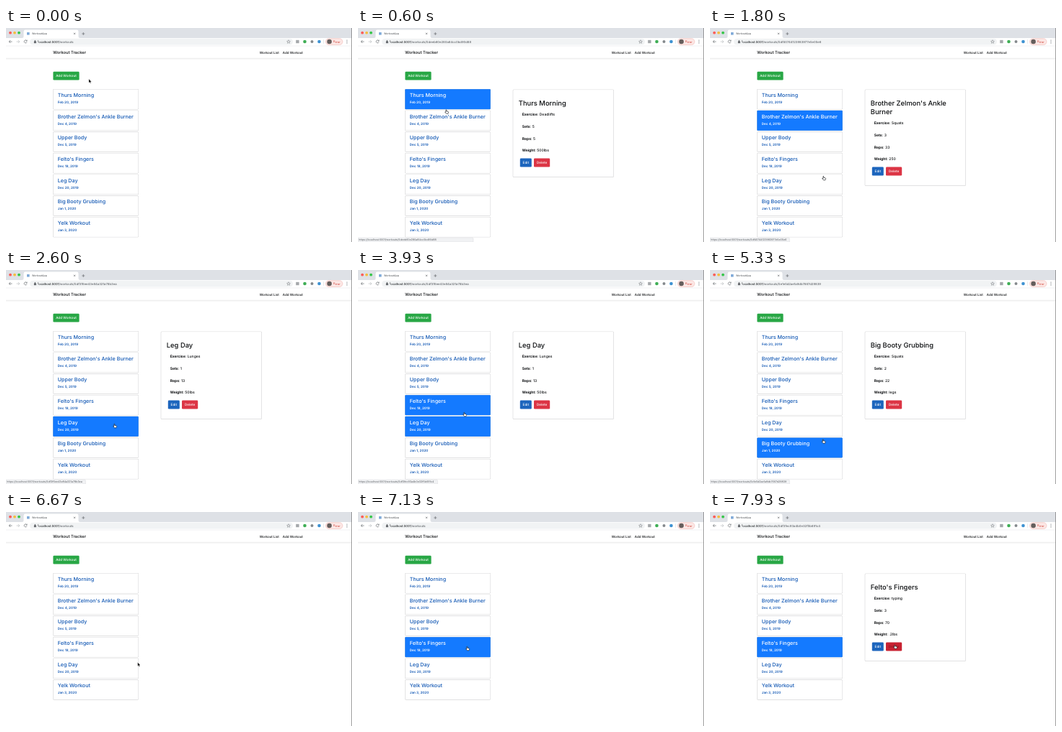
Animation of 480 by 298 pixels, one loop 8000 ms. Source, as an HTML page:

```html
<!DOCTYPE html>
<html lang="en">
<head>
<meta charset="utf-8">
<title>Workout Tracker</title>
<style>
  html, body { margin: 0; width: 100%; height: 100%; overflow: hidden; background: #fff; }
  svg { display: block; width: 480px; height: 298px; }
  /* the hair of rotation keeps tiny glyphs from snapping to the pixel grid */
  text {
    font-family: Inter, "Liberation Sans", sans-serif; font-weight: 500; white-space: pre;
    text-rendering: geometricPrecision;
    transform: rotate(.02deg); transform-box: fill-box;
  }
  .box { filter: drop-shadow(.7px .7px .5px rgba(0, 0, 0, .4)); }
</style>
</head>
<body>
<svg viewBox="0 0 480 298">
  <rect width="480" height="298" fill="#fff"/>
  <g id="browser">
    <rect width="480" height="14" fill="#dee1e6"/>
    <circle cx="6" cy="6.7" r="1.9" fill="#fc5b57"/>
    <circle cx="12" cy="6.7" r="1.9" fill="#f5bd3f"/>
    <circle cx="18" cy="6.7" r="1.9" fill="#35c649"/>
    <path d="M22 14Q24.5 14 24.5 11.5V5Q24.5 2.6 27 2.6H98Q100.500 2.6 100.500 5V11.500Q100.500 14 103 14Z" fill="#fff"/>
    <rect x="29" y="6" width="3.600" height="3.600" fill="#7fa9d8"/>
    <path d="M94 6.700l2.200 2.200m0-2.200l-2.200 2.200M107.300 6v4m-2-2h4" stroke="#55585c" stroke-width=".6"/>
    <rect y="14" width="480" height="11" fill="#fff"/>
    <g fill="none" stroke="#5f6368" stroke-width=".65">
      <path d="M8.500 19H4.200m2-2l-2 2l2 2"/>
      <path d="M14.500 19h4.300m-2-2l2 2l-2 2" stroke="#b4b7bb"/>
      <path d="M28.700 17.600A2 2 0 1 0 29 19.600M29.100 16.500v1.700h-1.700"/>
    </g>
    <rect x="33" y="14.800" width="365" height="8.600" rx="4.300" fill="#f1f3f4"/>
    <path d="M39 18.700h2.700v2.300H39zM39.600 18.700v-.7a.75.75 0 0 1 1.500 0v.7" fill="#5f6368" stroke="#5f6368" stroke-width=".3"/>
    <path d="M392 16.700l.7 1.600 1.700.1-1.300 1.100.4 1.700-1.500-.9-1.500.9.4-1.700-1.300-1.100 1.700-.1z" fill="none" stroke="#5f6368" stroke-width=".45"/>
    <rect x="402.200" y="16.800" width="4.400" height="4.400" fill="#a5a8ab"/>
    <circle cx="414.500" cy="19" r="2.300" fill="#3fae55"/>
    <circle cx="424.500" cy="19" r="2" fill="#84888c"/>
    <circle cx="434.500" cy="19" r="2.300" fill="#3f92d2"/>
    <path d="M440.500 16v6" stroke="#d5d7da" stroke-width=".5"/>
    <rect x="443.500" y="14.700" width="23.500" height="8.700" rx="4.350" fill="#fce8e6" stroke="#eeaaa4" stroke-width=".5"/>
    <circle cx="448.600" cy="19" r="3.300" fill="#655e5c"/>
    <g fill="#5f6368"><circle cx="473" cy="17" r=".6"/><circle cx="473" cy="19" r=".6"/><circle cx="473" cy="21" r=".6"/></g>
    <path d="M0 25H480" stroke="#e2e3e5" stroke-width=".5"/>
    <path d="M0 42.300H480" stroke="#dcdcdc" stroke-width=".6"/>
    <path d="M0 43.100H480" stroke="#f1f1f1"/>
    <rect x="479.300" width=".7" height="298" fill="#777"/>
  </g>
  <g id="page"></g>
  <g id="cursor" stroke-linejoin="round"><path/></g>
</svg>
<script>
const BLUE = '#147aff', LINK = '#1258b4', INK = '#0c0e10';
const $ = id => document.getElementById(id);

// title, date, id, exercise, sets, reps, weight
const workouts = [
  ['Thurs Morning', 'Feb 20, 2019', '5deeb60e280a84cc0bd90d88', 'Deadlifts', 5, 5, '500lbs'],
  ["Brother Zelmon's Ankle Burner", 'Dec 4, 2019', '5df40744123983977e5e05e6', 'Squats', 3, 33, '250'],
  ['Upper Body', 'Dec 5, 2019'],
  ["Felto's Fingers", 'Dec 19, 2019', '5df3fec93a4b0e32f5b691c4', 'typing', 3, 70, '.2lbs'],
  ['Leg Day', 'Dec 20, 2019', '5df3f6ee43e84a321a78b3ea', 'Lunges', 1, 13, '50lbs'],
  ['Big Booty Grubbing', 'Jan 1, 2020', '5e1e5d2ae1a9db7667d29839', 'Squats', 2, 22, 'legs'],
  ['Yelk Workout', 'Jan 3, 2020', '5e1e5d41e1a9db7667d2983a']
];

// state changes, each merged over the ones before
const events = [
  [0, { open: -1, hover: -1, status: -1, wide: true, hand: false, del: false, removed: false }],
  [200, { hover: 0, hand: true }],
  [467, { open: 0, status: 0 }],
  [667, { hover: 1 }],
  [733, { status: 1, wide: false }],
  [1000, { open: 1 }],
  [1867, { hover: 4 }],
  [2000, { status: 4 }],
  [2533, { open: 4 }],
  [3000, { hover: 3 }],
  [3133, { status: 3 }],
  [4133, { hover: 4 }],
  [4200, { hover: 5 }],
  [4333, { hover: 6, status: 6 }],
  [4800, { hover: 5 }],
  [5333, { open: 5, status: 5 }],
  [5733, { hover: -1 }],
  [5867, { status: -1, del: true }],
  [6267, { open: -1, removed: true, del: false }],
  [6333, { hand: false }],
  [6733, { hover: 4, hand: true }],
  [6933, { hover: 3 }],
  [7267, { status: 3, wide: true }],
  [7400, { open: 3 }],
  [7733, { hover: -1 }],
  [7867, { status: -1, del: true }]
];

// time, x, y of the pointer's centre
const path = [
  [0, 116.5, 74], [333, 122, 101], [467, 122, 102], [600, 123, 116.5], [733, 125, 125],
  [1400, 125, 125], [1467, 128, 123], [1600, 128, 123], [1800, 158, 209], [2067, 155, 219],
  [2333, 151, 217], [2800, 151, 217], [3000, 151, 198], [3867, 150, 198],
  [3933, 148, 201], [4067, 148, 201], [4400, 154, 276], [4667, 154, 276], [4867, 157.5, 238.5],
  [5600, 157.5, 238.5], [5933, 256, 188], [6400, 256, 188], [6533, 240, 196], [6600, 240, 196],
  [6667, 184, 212.5], [6800, 172, 222], [7133, 152, 190], [7533, 152, 190], [7867, 256, 188], [7933, 257, 187.5], [8000, 257, 187.5]
];

const esc = s => String(s).replace(/&/g, '&amp;').replace(/</g, '&lt;');
const text = (x, y, size, str, fill = INK, weight = 500, anchor = 'start') =>
  `<text x="${x}" y="${y}" font-size="${size}" fill="${fill}" style="font-weight:${weight}" text-anchor="${anchor}">${esc(str)}</text>`;
const rect = (x, y, w, h, fill, rx = 0, more = '') =>
  `<rect x="${x}" y="${y}" width="${w}" height="${h}" rx="${rx}" fill="${fill}" ${more}/>`;
const panel = (x, y, w, h, fill = '#fff') =>
  rect(x, y, w, h, fill, 1, `class="box" stroke="${fill === '#fff' ? '#e6e7e9' : fill}" stroke-width=".3"`);
const button = (x, y, w, h, label, fill, color = '#fff') =>
  rect(x, y, w, h, fill, 1.3) + text(x + w / 2, y + h / 2 + 1.7, 4.6, label, color, 500, 'middle');

function card([title, date], row, lit) {
  const y = 85.3 + row * 29.67, color = lit ? '#fff' : LINK;
  return panel(65.4, y, 118.3, 27.7, lit ? BLUE : '#fff') +
    text(71.8, y + 10.8, 7.15, title, color) +
    text(71.8, y + 19.7, 4.6, date, color, 600);
}

function detail([title, , , ...values], del) {
  const words = title.split(' ');
  const lines = words.length > 3 ? [words.slice(0, -1).join(' '), words.at(-1)] : [title];
  const dy = (lines.length - 1) * 12;
  return panel(215.1, 86, 139.5, 121.5 + dy) +
    lines.map((line, i) => text(222.8, 108.3 + i * 12, 9.4, line)).join('') +
    ['Exercise', 'Sets', 'Reps', 'Weight'].map((label, i) =>
      `<text x="227.7" y="${122.3 + dy + i * 16.7}" font-size="5.05" fill="${INK}"><tspan font-weight="700">${label}:</tspan> ${esc(values[i])}</text>`
    ).join('') +
    button(224.8, 181.6 + dy, 16, 11.9, 'Edit', '#1c65bd') +
    button(244, 181.6 + dy, 22.2, 11.9, 'Delete', del ? '#c82333' : '#dc3545', del ? '#8a1c2a' : '#fff');
}

function statusBar({ status, wide }) {
  const w = wide ? 160 : 110.5;
  return `<path d="M0 292H${w - 1.5}Q${w} 292 ${w} 293.500V298H0Z" fill="#f1f2f4" stroke="#d3d5d8" stroke-width=".4"/>` +
    text(1.3, 296.2, 3.6, 'https://localhost:5001/workouts/' + workouts[status][2], '#55595e', 400);
}

function page(s) {
  const id = s.open < 0 ? '' : '/' + workouts[s.open][2];
  const list = workouts.map((w, i) => [w, i]).filter(([, i]) => !(s.removed && i === 5));
  return text(36, 9.3, 3.55, 'WorkoutApp', '#45494d', 400) +
    `<text x="44.3" y="20.500" font-size="4.200" fill="#25282b">localhost:5001<tspan fill="#62666b">/workouts${id}</tspan></text>` +
    text(454.3, 20.5, 4, 'Error', '#d24a40') +
    text(65.2, 36, 5.75, 'Workout Tracker') +
    text(351.7, 35.6, 4.5, 'Workout List') +
    text(383.8, 35.6, 4.5, 'Add Workout') +
    button(65.4, 60.8, 36.2, 11.8, 'Add Workout', '#28a745') +
    list.map(([w, i], row) => card(w, row, i === s.open || i === s.hover)).join('') +
    (s.open < 0 ? '' : detail(workouts[s.open], s.del)) +
    (s.status < 0 ? '' : statusBar(s));
}

const shapes = {
  arrow: 'M-1.6-2.9V2.300L-.400 1.200L.500 3.100L1.400 2.700L.500.900H2.100Z',
  hand: 'M-1-2.600Q-.300-3-.200-2V-.700L2.100-.100Q2.800.300 2.500 1.300L1.900 2.800H-.500L-2.400.600Q-2.500-.100-1.100.600Z'
};

function pointer(t) {
  const i = Math.max(1, path.findIndex(p => p[0] >= t));
  const [t0, x0, y0] = path[i - 1], [t1, x1, y1] = path[i];
  const k = (t - t0) / (t1 - t0);
  return [x0 + (x1 - x0) * k, y0 + (y1 - y0) * k];
}

const TICK = 1000 / 15, LOOP = 8000;
const cursor = $('cursor'), glyph = cursor.firstElementChild;
const start = performance.now();
let shown = '';

function draw() {
  const t = Math.floor(((performance.now() - start) % LOOP + 5) / TICK) * TICK % LOOP;
  const state = Object.assign({}, ...events.filter(e => e[0] <= t + 1).map(e => e[1]));
  const key = JSON.stringify(state);
  if (key !== shown) {
    $('page').innerHTML = page(state);
    glyph.setAttribute('d', state.hand ? shapes.hand : shapes.arrow);
    glyph.setAttribute('fill', state.hand ? '#fff' : '#000');
    glyph.setAttribute('stroke', state.hand ? '#16191c' : '#fff');
    glyph.setAttribute('stroke-width', state.hand ? .65 : .3);
    shown = key;
  }
  cursor.setAttribute('transform', `translate(${pointer(t)})`);
  requestAnimationFrame(draw);
}
draw();
</script>
</body>
</html>
```
